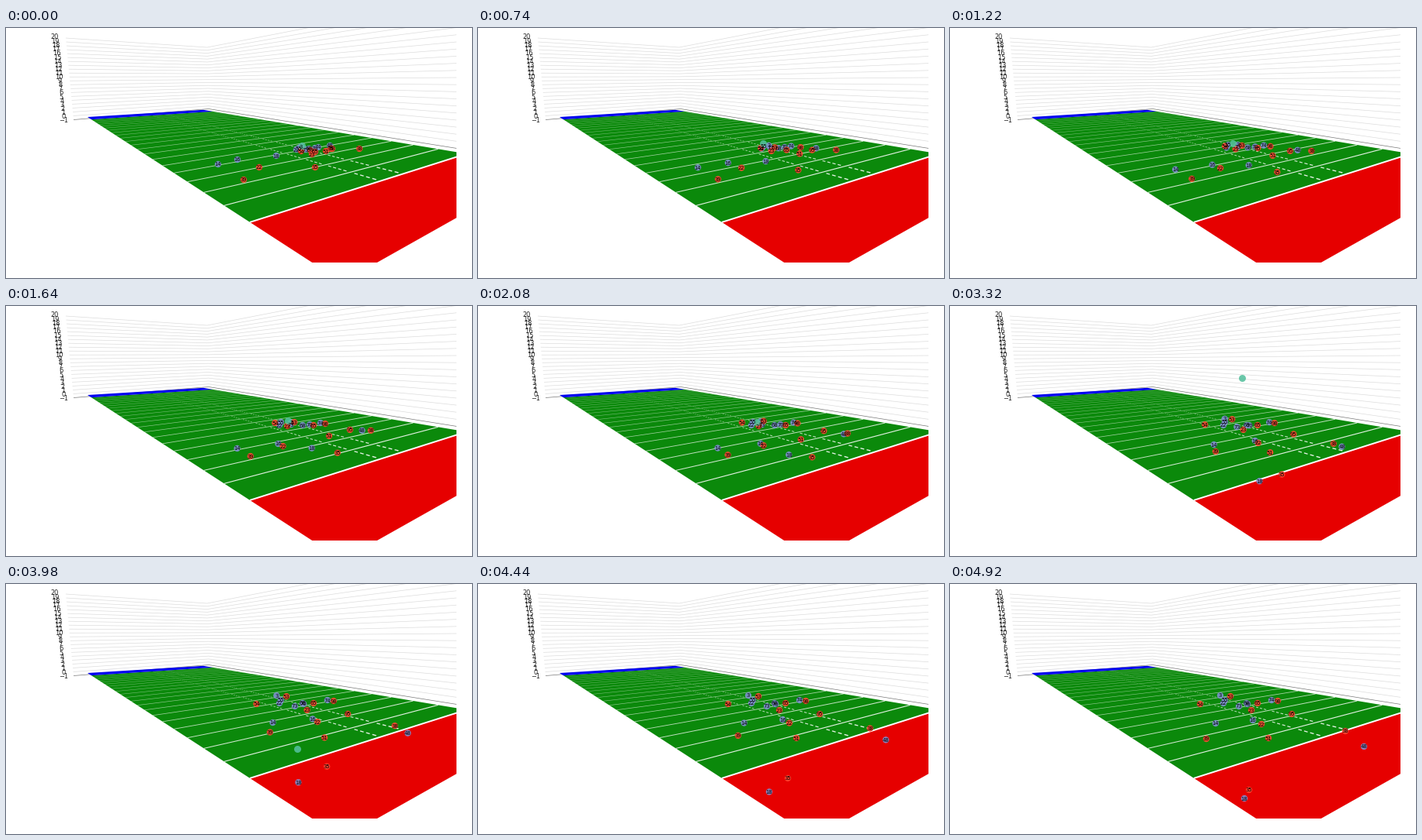
Animation of 600x323 px, one loop 4.98 s. Source, as a matplotlib script:

```python
import numpy as np
import matplotlib.pyplot as plt
from matplotlib.animation import FuncAnimation
from matplotlib.collections import LineCollection

W, H = 600, 323
VIEW_W, VIEW_H = 580, 303
FRAMES, STEP = 166, 30
RED, BLUE, BALL = "#ff4632", "#8291d6", "#55c09d"

plt.rcParams["font.family"] = "DejaVu Sans"
fig = plt.figure(figsize=(W / 100, H / 100), dpi=100, facecolor="white")
ax = fig.add_axes([0, 1 - VIEW_H / H, VIEW_W / W, VIEW_H / H])
ax.set_xlim(0, VIEW_W)
ax.set_ylim(VIEW_H, 0)
ax.axis("off")


def project(yard, side):
    """Stage point of a field spot; side runs from 0 (left) to 1 (right)."""
    depth = 1 - yard / 147.2 + 0.2317 * side
    x = (105 - 0.233 * yard + 207.9 * side) / depth
    y = (115 - 0.469 * yard + 15.3 * side) / depth
    return x, y


def add_lines(segments, widths, colors, z):
    ax.add_collection(LineCollection(segments, linewidths=widths,
                                     colors=colors, zorder=z))


def draw_walls():
    vanish_x, vanish_y = 35.5, 68.5
    rows = []
    for height in range(-1, 21):
        k = (height + 1) / 21
        left = (87 - 10 * k, 118.5 - 105.5 * k)
        corner = (261 - 2 * k, 104.5 - 79.5 * k)
        grow = (VIEW_W - vanish_x) / (corner[0] - vanish_x)
        right = (VIEW_W, vanish_y + (corner[1] - vanish_y) * grow)
        rows.append([left, corner, right])
        ax.text(74.5 - 11.5 * k, 119 - 104 * k - 3 * k * k,
                f"{height}".replace("-", "\u2212"),
                fontsize=5.9, color="#222222", ha="center", va="center")
    add_lines(rows[1:], 0.5, "#dcdcdc", 1)
    add_lines(rows[:1], 0.5, "#777777", 1)


def draw_field():
    def strip(start, end, color):
        corners = [project(start, 0), project(start, 1),
                   project(end, 1), project(end, 0)]
        ax.fill(*zip(*corners), color=color, lw=0, zorder=2)

    strip(9.5, 110, "#0b890b")
    strip(0, 9.5, "#0000f0")
    strip(110, 121.1, "#e60000")

    yards = np.arange(15, 110, 5)
    near = (yards / 110) ** 3
    add_lines([[project(s, 0), project(s, 1)] for s in yards],
              0.3 + 0.6 * near, [(1, 1, 1, 0.4 + 0.55 * n) for n in near], 3)
    add_lines([[project(110, 0), project(110, 1)]], 1.4, "white", 3)

    marks = [s for s in range(11, 110) if s % 5]
    for side in (0.443, 0.557):
        add_lines([[project(s - 0.3, side), project(s + 0.3, side)] for s in marks],
                  [0.25 + 0.75 * (s / 110) ** 3 for s in marks],
                  [(1, 1, 1, 0.35 + 0.6 * (s / 110) ** 3) for s in marks], 3)


def glide(times, points, t):
    """Smooth cubic path through timed points."""
    times, points = np.array(times, float), np.array(points, float)
    t = min(max(t, times[0]), times[-1])
    if len(times) == 2:
        slopes = np.zeros_like(points)
    else:
        slopes = np.gradient(points, times, axis=0)
    i = min(np.searchsorted(times, t, side="right") - 1, len(times) - 2)
    span = times[i + 1] - times[i]
    u = (t - times[i]) / span
    return ((1 + 2 * u) * (1 - u) ** 2 * points[i]
            + u * (1 - u) ** 2 * span * slopes[i]
            + u * u * (3 - 2 * u) * points[i + 1]
            + u * u * (u - 1) * span * slopes[i + 1])


# Key times by number of waypoints: blockers settle early, runners keep going.
TIMES = {
    2: [0, 1640],
    3: [0, 1640, 4000],
    4: [0, 1640, 3320, 4920],
    5: [0, 1640, 3320, 3980, 4920],
}
RUNNERS = [
    (BLUE, "14", [(273, 176), (298, 184), (340, 179), (342, 180)]),
    (BLUE, "16", [(298, 170), (351, 178), (393, 174), (390, 176)]),
    (BLUE, "18", [(348, 165), (394, 184), (398, 227), (376, 257), (379, 277)]),
    (BLUE, "48", [(417, 152), (459, 161), (505, 182), (533, 210)]),
    (RED, "39", [(306, 196), (315, 194), (342, 188), (330, 200)]),
    (RED, "22", [(326, 180), (357, 181), (397, 177), (401, 181)]),
    (RED, "35", [(398, 180), (427, 190), (427, 218), (385, 266)]),
    (RED, "38", [(455, 156), (470, 161), (494, 178), (509, 190)]),
]
LINEMEN = [
    (BLUE, "3", [(380, 153), (367, 150), (348, 144)]),
    (BLUE, "74", [(402, 154), (405, 151), (414, 150)]),
    (BLUE, "70", [(398, 155), (391, 153), (383, 155)]),
    (BLUE, "68", [(390, 156), (382, 154)]),
    (BLUE, "73", [(386, 157), (367, 153), (372, 158)]),
    (BLUE, "55", [(377, 155), (354, 150)]),
    (BLUE, "22", [(374, 157), (352, 154)]),
    (RED, "95", [(418, 156), (443, 160), (440, 168)]),
    (RED, "51", [(412, 159), (416, 168), (410, 199)]),
    (RED, "54", [(380, 159), (346, 151), (322, 155)]),
    (RED, "23", [(394, 163), (362, 155), (388, 163)]),
    (RED, "98", [(420, 156), (411, 152), (422, 151)]),
    (RED, "65", [(398, 160), (396, 154)]),
    (RED, "53", [(392, 158), (371, 150), (361, 145)]),
]
PLAYERS = RUNNERS + LINEMEN

BALL_TIMES = [0, 740, 1640, 2180, 2520, 2780, 3320, 3800, 3980, 4300]
BALL_PATH = [(381, 152), (367, 149), (363, 148), (360, 143), (370, 92),
             (373, 82), (376, 95), (376, 172), (375, 219), (373, 318)]


def spots_at(t):
    return [glide(TIMES[len(route)], route, t) for _, _, route in PLAYERS]


draw_walls()
draw_field()
dots = ax.scatter(*zip(*spots_at(0)), s=36, c=[p[0] for p in PLAYERS],
                  alpha=0.88, lw=0, zorder=5)
ball = ax.scatter(*BALL_PATH[0], s=42, c=BALL, alpha=0.88, lw=0, zorder=6)
labels = [ax.text(0, 0, p[1], fontsize=4.9, color="black", ha="center",
                  va="center_baseline", zorder=7) for p in PLAYERS]


def update(n):
    t = n * STEP
    spots = spots_at(t)
    dots.set_offsets(spots)
    ball.set_offsets([glide(BALL_TIMES, BALL_PATH, t)])
    for label, spot in zip(labels, spots):
        label.set_position(spot)
    return [dots, ball, *labels]


anim = FuncAnimation(fig, update, frames=FRAMES, interval=STEP,
                     repeat=True, repeat_delay=0, blit=False)
plt.show()
```
